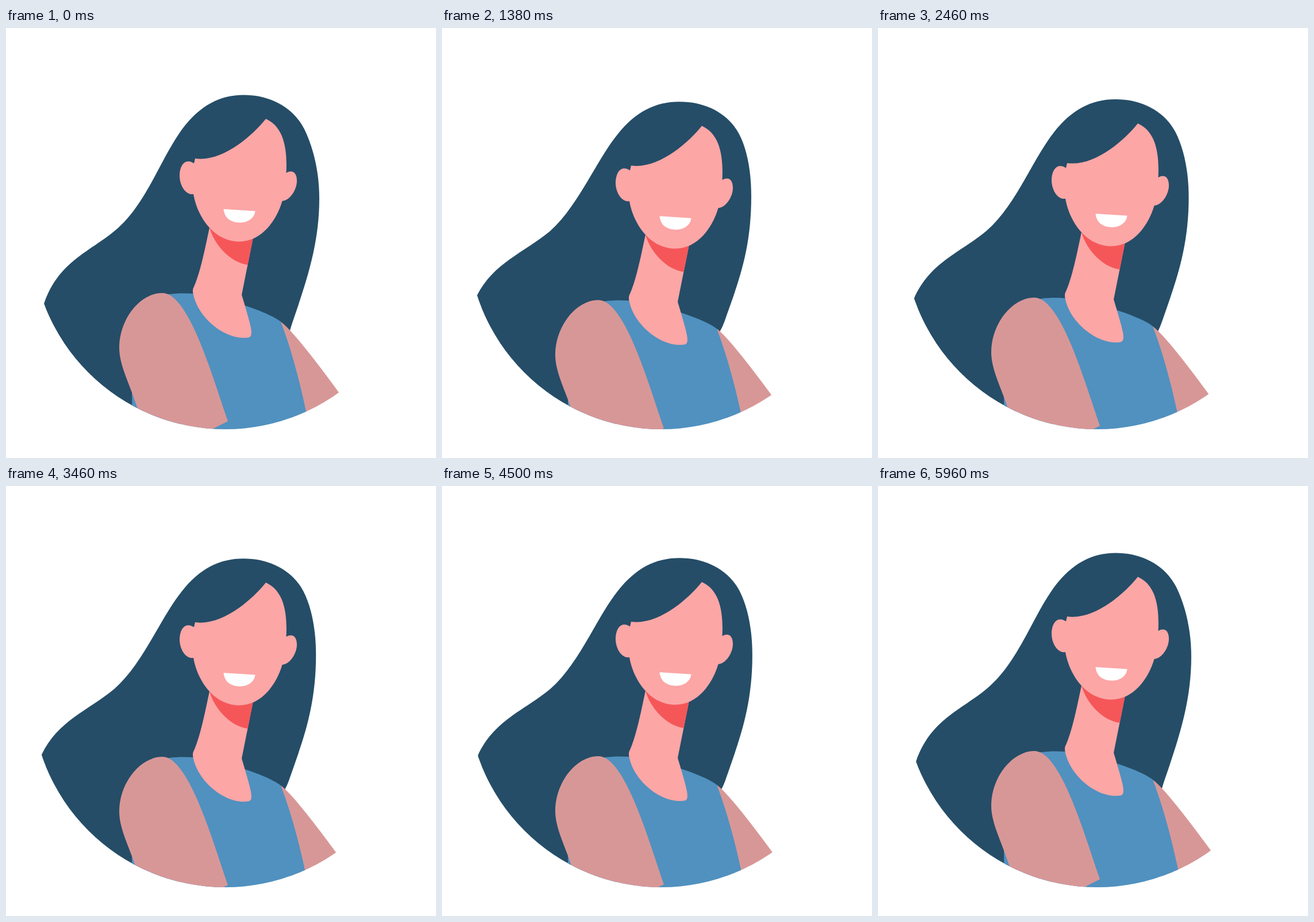
An HTML page for the animation above (6000 ms loop, 748 px wide and 748 px high).

```html
<!DOCTYPE html>
<html lang="en">
<head>
<meta charset="utf-8">
<title>Breathing portrait</title>
<style>
  html, body { margin: 0; width: 100%; height: 100%; overflow: hidden; background: #fff; }
  svg { display: block; width: 100%; height: 100%; }
</style>
</head>
<body>
<svg viewBox="0 0 748 748">
  <clipPath id="disc"><circle cx="381.5" cy="361" r="337"/></clipPath>
  <g clip-path="url(#disc)">
    <path id="hair" fill="#254d67"/>
    <g id="body">
      <path fill="#d89797" d="M478 511Q501.5 528 579 634L620 692L500 720Z"/>
      <path fill="#5091bf" d="M219 630L220 720L535 720L522 667C510 610 495 555 478 511C470 504 447 493 416 483L326 462C310 461 296 461.5 283 463L270 470Z"/>
      <path fill="#d89797" d="M272 461C233 461 197 507 197 556C197 582 210 609 219 634L229 662L240 712L330 712L386 684C360 610 318.5 461 272 461Z"/>
      <path fill="#fca6a6" d="M354 347C346 385 338 425 327 450C325 453 325 456 325 459C331 501 377 540 415 539L421 538.5C428 538 428 530 425 517C422 504 415 481 410 464L430 364Z"/>
      <path fill="#f55759" d="M354 347C362 377 390 408 420.5 412L430 364L400 340Z"/>
      <path fill="#fca6a6" d="M452 158C427.5 188.5 376 233.5 329 227L327 235.5C311 225 302 240 302 257C302 273 312 291 326 289C333 329 362 371.5 406 371.5C445 371.5 471 334 480.5 301C494 300 506 281 506 266C506 251 498 246 487.5 252C490 205 481 171 452 158Z"/>
      <path fill="#fff" d="M378.5 315L433.5 318.5C432 331 421 338.5 406 338.5C390 338 380 330 378.5 315Z"/>
    </g>
  </g>
</svg>
<script>
  const LOOP = 6000, BREATH = 2000, FPS = 24;
  const hair = document.getElementById('hair');
  const body = document.getElementById('body');

  const HAIR_UP = 'M63 488L66 480C91 406 145 390 190 352C243 308 268 229 306 176.5C337 135 372 116.5 413 116.5C459 116.5 499 137 519 176C536 211 545 253 545 297C545 376 523 440 498 513Q496 519 494 526L470 620L230 720L40 720Z';
  const HAIR_DOWN = 'M54 468L59 460C90 409 139 393 187 354C236 309 268 231 306 187C337 150 370 132.5 413 132.5C457 132.5 496 151 516 187C531 215 535.5 254 535.5 292C535.5 395 510 450 489 510Q485 521 480 528L470 620L230 720L40 720Z';

  const NUMBER = /[\d.]+/g;
  const downValues = HAIR_DOWN.match(NUMBER).map(Number);

  function mixHair(k) {
    let i = 0;
    return HAIR_UP.replace(NUMBER, n => (+n + (downValues[i++] - n) * k).toFixed(2));
  }

  const easeInOut = x => x * x * (3 - 2 * x);

  function draw(ms) {
    const frame = Math.floor((ms % LOOP + 4) * FPS / 1000);
    const phase = (frame * 1000 / FPS) % BREATH / (BREATH / 2);
    const drop = easeInOut(phase < 1 ? phase : 2 - phase);
    body.setAttribute('transform', `translate(0 ${(18 * drop).toFixed(2)})`);
    // The hair swings slightly past its lower key shape.
    hair.setAttribute('d', mixHair(1.083 * drop));
  }

  const start = performance.now();
  function tick() {
    draw(performance.now() - start);
    requestAnimationFrame(tick);
  }
  draw(0);
  requestAnimationFrame(tick);
</script>
</body>
</html>
```
